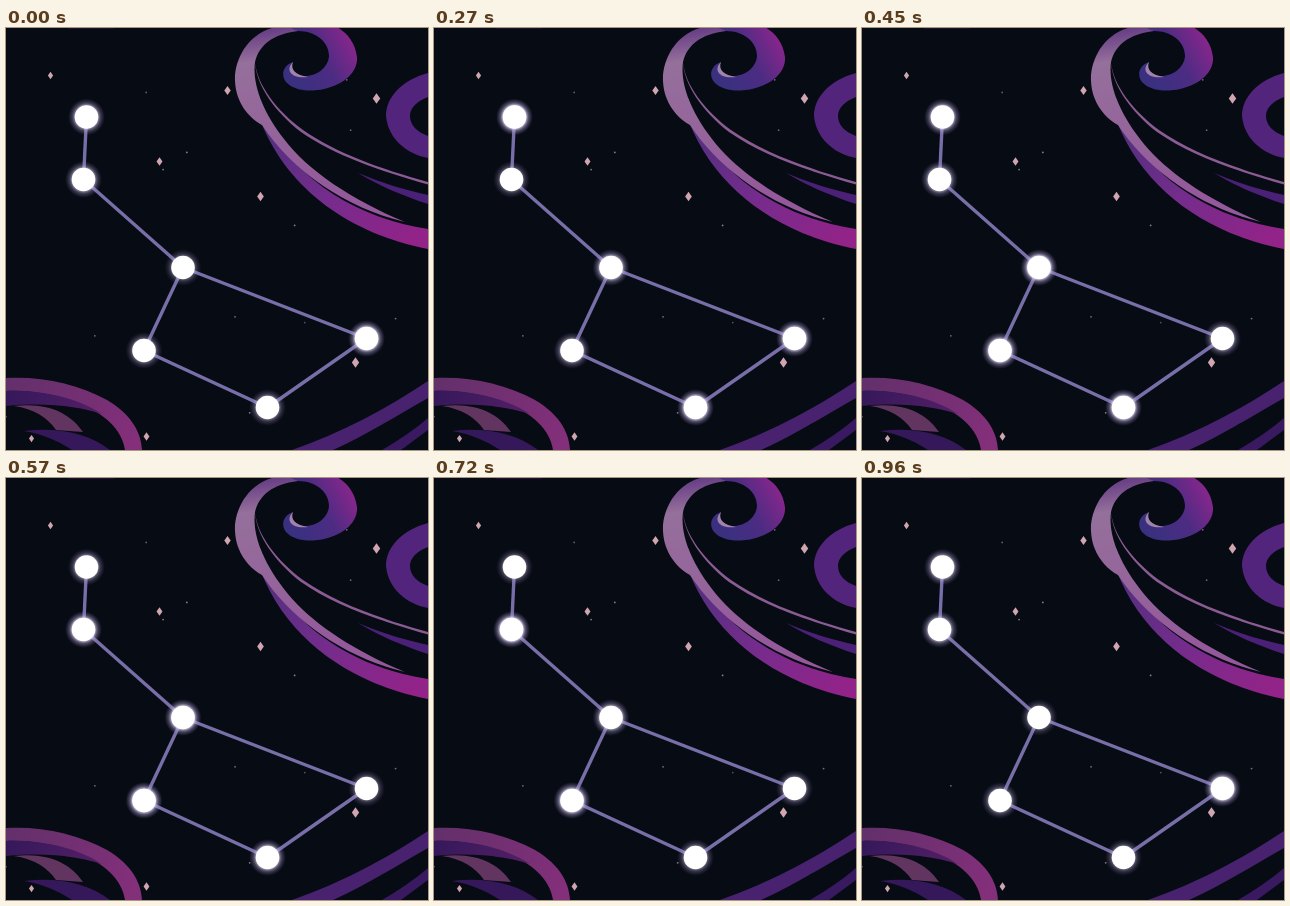
Recreate the animation shown at these times as an HTML page. Size 422x422 px, loop 0.99 s.

```html
<!DOCTYPE html>
<html lang="en">
<head>
<meta charset="utf-8">
<title>Constellation</title>
<style>
  html, body { margin: 0; width: 100%; height: 100%; overflow: hidden; background: #070b14; }
  svg { display: block; width: 100%; height: 100%; }
</style>
</head>
<body>
<svg viewBox="0 0 422 422">
  <defs>
    <linearGradient id="head" gradientUnits="userSpaceOnUse" x1="290" y1="50" x2="348" y2="18">
      <stop offset="0" stop-color="#3b3080"/>
      <stop offset=".5" stop-color="#4c2c82"/>
      <stop offset="1" stop-color="#86268c"/>
    </linearGradient>
    <linearGradient id="mauve" gradientUnits="userSpaceOnUse" x1="275" y1="0" x2="300" y2="170">
      <stop offset="0" stop-color="#683f85"/>
      <stop offset=".17" stop-color="#95709b"/>
      <stop offset="1" stop-color="#94599a"/>
    </linearGradient>
    <linearGradient id="sweep" gradientUnits="userSpaceOnUse" x1="258" y1="100" x2="405" y2="215">
      <stop offset="0" stop-color="#52307f"/>
      <stop offset=".5" stop-color="#752c8c"/>
      <stop offset="1" stop-color="#922388"/>
    </linearGradient>
    <linearGradient id="wave" gradientUnits="userSpaceOnUse" x1="0" y1="355" x2="130" y2="415">
      <stop offset="0" stop-color="#62306a"/>
      <stop offset="1" stop-color="#842f7a"/>
    </linearGradient>
    <linearGradient id="deep" gradientUnits="userSpaceOnUse" x1="0" y1="365" x2="110" y2="400">
      <stop offset="0" stop-color="#35185a"/>
      <stop offset="1" stop-color="#5a2068"/>
    </linearGradient>
    <radialGradient id="glow">
      <stop offset=".6" stop-color="#ece6fb" stop-opacity=".95"/>
      <stop offset=".76" stop-color="#b6a8d8" stop-opacity=".45"/>
      <stop offset="1" stop-color="#8074b0" stop-opacity="0"/>
    </radialGradient>
  </defs>

  <rect width="422" height="422" fill="#070b14"/>
  <path d="M62 0H108" stroke="#3a1747"/>

  <!-- upper right swirl -->
  <path fill="url(#sweep)" d="M255 94C282 162 345 206 422 221V201C355 191 290 154 262 94Z"/>
  <path fill="url(#mauve)" d="M270 -1C241 5 228 33 229 53C230 75 243 90 256 97C286 143 340 180 399 194C346 172 301 142 278 111C257 84 246 56 249 34C253 17 267 6 292 3L300 -1Z"/>
  <path fill="url(#head)" d="M287 34C278 37 274 46 280 54C288 63 304 64 318 61C340 56 352 43 351 29C349 14 341 5 331 -1H282L292 3C310 3 323 14 323 28C322 41 309 49 296 48C285 47 282 40 287 34Z"/>
  <path fill="#a283ac" d="M287 34C279 42 285 51 302 49C290 47 284 42 287 34Z"/>
  <path fill="#8b5b93" d="M249 34C251 57 271 83 297 102C330 125 375 141 422 154V156.500C374 143 328 127 295 104C269 84 250 57 249 34Z"/>
  <path fill="#4b2077" d="M352 145C376 155 399 162 422 167V176C397 168 374 158 352 145Z"/>
  <path fill="#52247b" d="M422 45C396 52 380 69 380 88C382 110 400 126 422 130V108C411 104 404 97 404 88C404 80 411 73 422 69Z"/>

  <!-- lower right bands -->
  <path fill="#48226f" d="M286 422C335 405 380 381 422 353V370C390 388 362 406 327 422Z"/>
  <path fill="#39195f" d="M376 422C393 412 408 402 422 390V402L395 422Z"/>

  <!-- lower left wave -->
  <path fill="url(#wave)" d="M0 350C36 348 72 356 101 372C123 385 135 402 136 422H119C116 401 98 385 70 374C47 366 24 362 0 363Z"/>
  <path fill="url(#deep)" d="M0 363C36 361 74 371 96 386C74 379 42 374 0 378Z"/>
  <path fill="#623561" d="M8 378C43 374 65 386 77 404L50 402C41 389 28 381 8 378Z"/>
  <path fill="#35185a" d="M18 403C51 399 82 405 104 422H66C51 412 36 406 18 403Z"/>

  <g id="specks" fill="#c9b3c4"/>
  <g id="sparks" fill="#cfa5b0"/>
  <g id="lines" stroke="#786fa9" stroke-width="3.4"/>
  <g id="stars"/>
</svg>
<script>
  const LOOP = 990, TICK = 30, SIZE = 422;

  function add(parent, tag, attrs) {
    const el = document.createElementNS("http://www.w3.org/2000/svg", tag);
    for (const key in attrs) el.setAttribute(key, attrs[key]);
    return document.getElementById(parent).appendChild(el);
  }

  let seed = 7;
  const random = () => (seed = seed * 16807 % 2147483647) / 2147483647;

  for (let i = 0; i < 13; i++) {
    add("specks", "circle", {
      cx: random() * SIZE, cy: random() * SIZE, r: .9, opacity: .4 + .3 * random()
    });
  }

  // Sparks grow slightly towards the right.
  const sparks = [[44, 47], [221, 62], [370, 70], [153, 133], [254, 168], [349, 334], [140, 408], [25, 410]];
  for (const [x, y] of sparks) {
    const h = 3.5 + x / 200, w = h * .7;
    add("sparks", "path", { d: `M${x + .5} ${y + .5 - h}l${w} ${h}l${-w} ${h}l${-w} ${-h}Z` });
  }

  // Listed in the order in which they light up.
  const points = [[360.5, 310.5], [80.5, 89], [261.5, 379.5], [177, 239.5], [138, 322.5], [77.5, 151.5]];

  function link(...path) {
    path.slice(1).forEach((to, i) => {
      const [x1, y1] = points[path[i]], [x2, y2] = points[to];
      add("lines", "line", { x1, y1, x2, y2 });
    });
  }
  link(1, 5, 3, 0, 2, 4, 3);

  const glows = points.map(([cx, cy]) => {
    const glow = add("stars", "circle", { cx, cy, r: 18.5, fill: "url(#glow)" });
    add("stars", "circle", { cx, cy, r: 11.8, fill: "#fff" });
    return glow;
  });

  function draw(now) {
    const t = Math.floor((now % LOOP) / TICK) * TICK;
    glows.forEach((glow, i) => {
      const peak = 120 * (i + 1);
      const wave = .5 + .5 * Math.cos(2 * Math.PI * (t - peak) / LOOP);
      glow.setAttribute("opacity", .45 + .55 * wave);
    });
  }

  const start = performance.now();
  function frame() {
    draw(performance.now() - start);
    requestAnimationFrame(frame);
  }
  frame();
</script>
</body>
</html>
```
